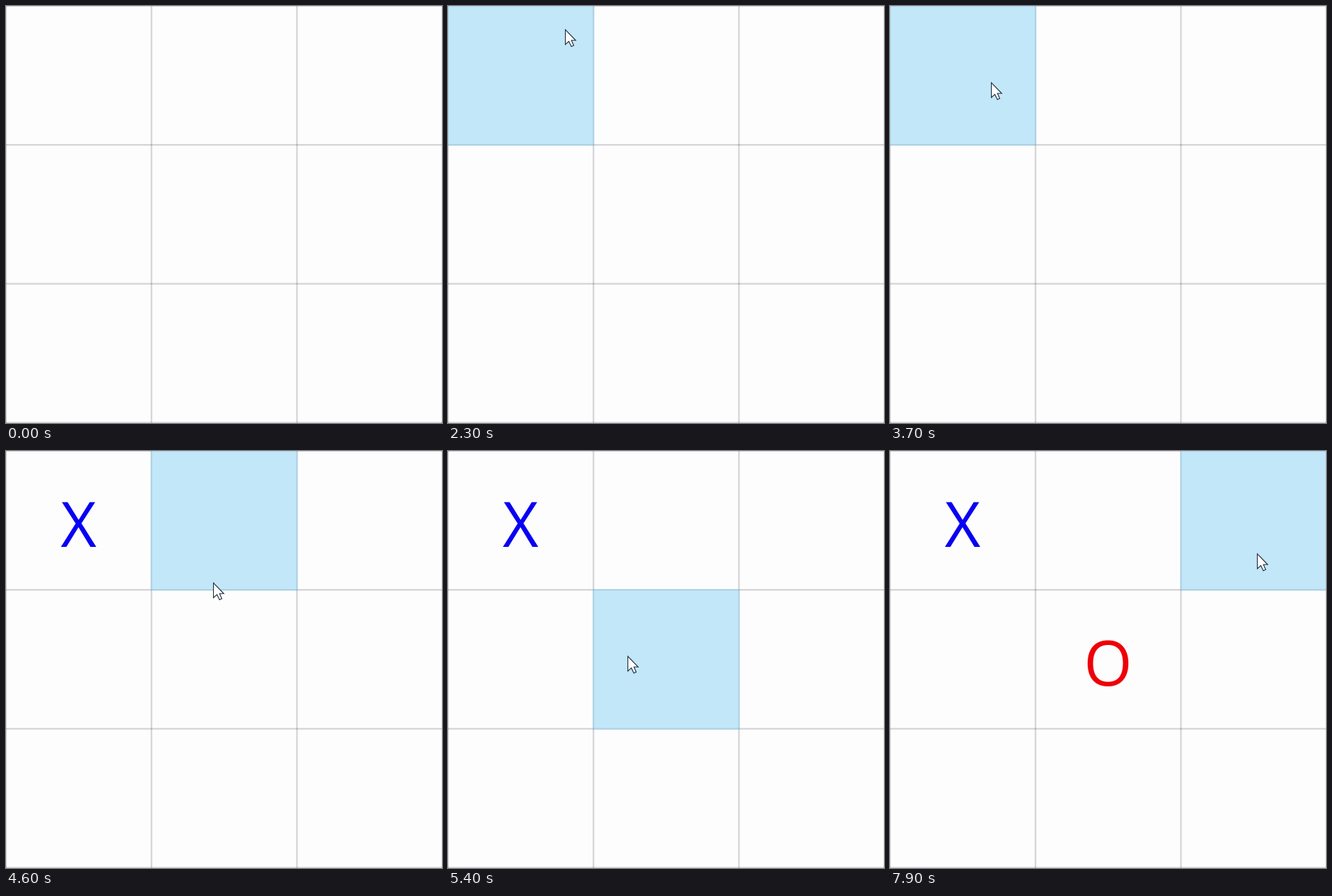
An HTML page for the animation above (8000 ms loop, 600x574 px).

```html
<!DOCTYPE html>
<html lang="en">
<head>
<meta charset="utf-8">
<title>Noughts and crosses</title>
<style>
  html, body { margin: 0; width: 100%; height: 100%; overflow: hidden; background: #fefdfe; }
  svg { display: block; width: 600px; height: 574px; }
  text { font: 85.4px "Open Sans", sans-serif; text-anchor: middle; }
</style>
</head>
<body>
<svg viewBox="0 0 600 574">
  <g id="grid" fill="none" stroke="#1c1626" stroke-width="2.2" stroke-opacity=".18"></g>
  <rect id="hover" fill="#86d1f6" fill-opacity=".5"/>
  <text id="cross" x="100" y="132" fill="#0800f2">X</text>
  <text id="nought" x="300" y="323" fill="#ee0008">O</text>
  <path id="cursor" d="M0 0V20.5L4.8 16.2L8.3 23.2L11.5 21.8L8.4 14.8H14.2Z"
        fill="#fff" stroke="#242c3e" stroke-width="1.1"/>
</svg>
<script>
const LOOP = 8000, STEP = 100;
const ENTER_AT = 1500, CROSS_AT = 4300, NOUGHT_AT = 6200;
const CELL_W = 200.2, CELL_H = 191.2;

// The pointer rests between moves; bend bows a move sideways
const ENTRY = { x: 470, y: 24 };
const MOVES = [
  { from: 1500, to: 1600, x: 262, y: 30 },
  { from: 2200, to: 2300, x: 161.5, y: 32.5 },
  { from: 2300, to: 3000, x: 222, y: 110, bend: 70 },
  { from: 3100, to: 3900, x: 112, y: 104 },
  { from: 4200, to: 4600, x: 285.5, y: 181.5 },
  { from: 4600, to: 5200, x: 168, y: 304, bend: -40 },
  { from: 5200, to: 5400, x: 247.5, y: 282.5 },
  { from: 6500, to: 6900, x: 370.5, y: 269.5 },
  { from: 6900, to: 7400, x: 490, y: 290 },
  { from: 7400, to: 7900, x: 505.5, y: 141.5, bend: 15 }
];

const $ = id => document.getElementById(id);
const show = (el, on) => { el.style.visibility = on ? "visible" : "hidden"; };
const setAll = (el, attrs) => {
  for (const name in attrs) el.setAttribute(name, attrs[name]);
};
const hover = $("hover"), cursor = $("cursor"), cross = $("cross"), nought = $("nought");

for (let i = 0; i <= 3; i++) {
  $("grid").innerHTML += `<path d="M${i * CELL_W} 0V574"/><path d="M0 ${i * CELL_H}H600"/>`;
}

function pointerAt(t) {
  let { x, y } = ENTRY;
  for (const m of MOVES) {
    if (t <= m.from) break;
    const k = Math.min(1, (t - m.from) / (m.to - m.from));
    const dx = m.x - x, dy = m.y - y;
    const bow = (m.bend || 0) * 4 * k * (1 - k) / Math.hypot(dx, dy);
    x += dx * k - dy * bow;
    y += dy * k + dx * bow;
  }
  return { x, y };
}

function draw(t) {
  const present = t >= ENTER_AT;
  const { x, y } = pointerAt(t);
  show(cursor, present);
  show(hover, present);
  show(cross, t >= CROSS_AT);
  show(nought, t >= NOUGHT_AT);
  setAll(cursor, { transform: `translate(${x} ${y})` });
  setAll(hover, {
    x: Math.floor(x / CELL_W) * CELL_W - 1,
    y: Math.floor(y / CELL_H) * CELL_H - 1,
    width: CELL_W + 2,
    height: CELL_H + 2
  });
}

const start = performance.now();
function tick() {
  const t = (performance.now() - start) % LOOP;
  draw(Math.floor(t / STEP) * STEP);
  requestAnimationFrame(tick);
}
tick();
</script>
</body>
</html>
```
